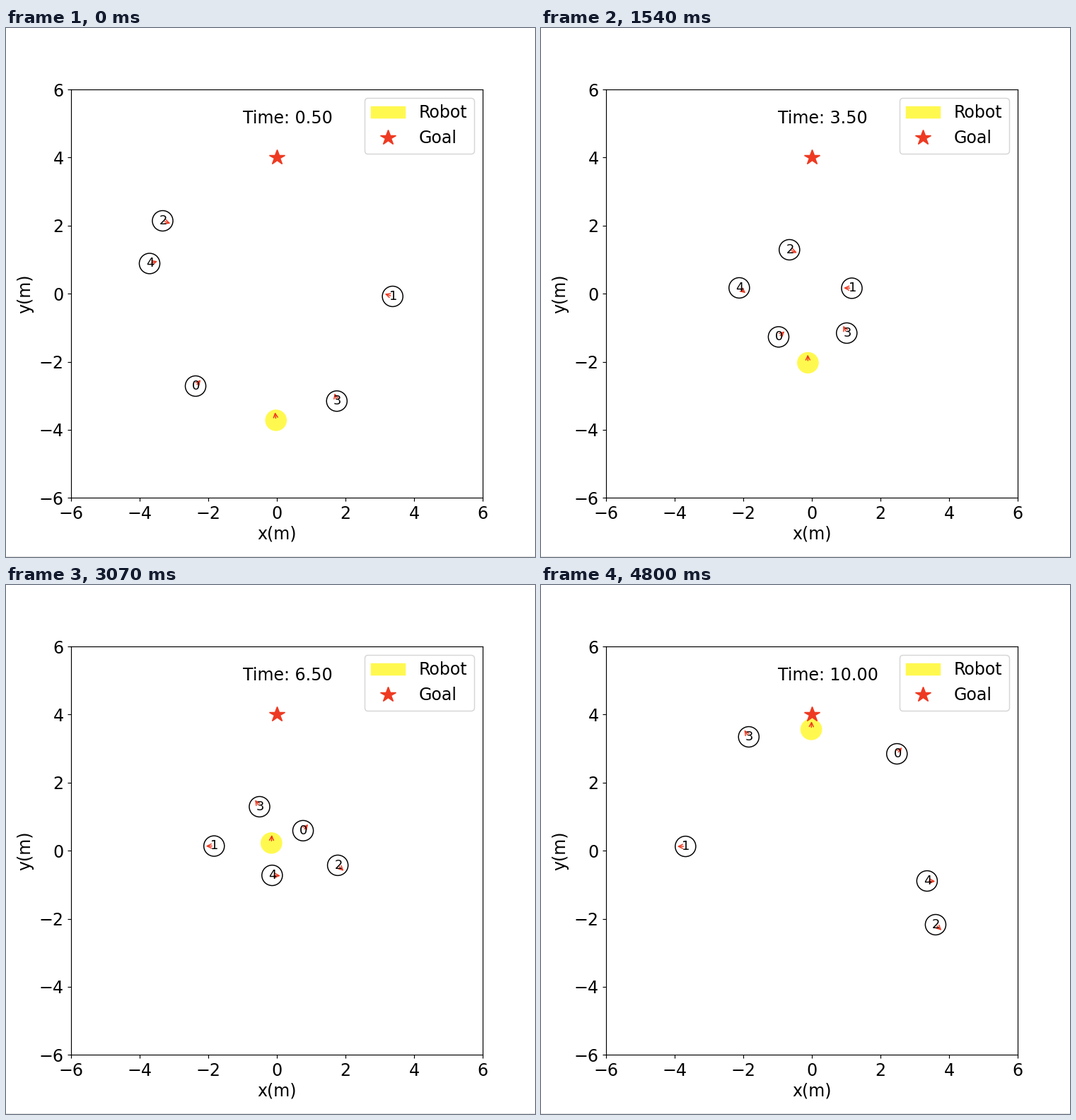
Write a matplotlib script that moves like this. It is 748 by 749 pixels and loops after 4870 ms.

```python
import numpy as np
import matplotlib.pyplot as plt
from matplotlib.animation import FuncAnimation
from matplotlib.lines import Line2D
from matplotlib.patches import ArrowStyle, Circle, FancyArrowPatch

W, H, DPI = 748, 749, 107.2
LOOP_MS, FRAMES = 4870, 146
DT = 0.25                  # simulated seconds per step
LAST = 38                  # number of steps in the run
KEY_STEPS = [0, 7, 12, 21]  # after the last one all agents head for their goals
RADIUS = 0.3
RED, YELLOW = "#ee3a22", "#fff94f"

# Four key points in metres, then the goal; the robot comes first.
AGENTS = [
    [(-0.025, -3.72), (-0.1, -2.72), (-0.115, -2.03), (-0.19, -0.525), (0, 4)],
    [(-2.37, -2.715), (-1.59, -1.865), (-0.97, -1.27), (0.31, -0.01), (2.59, 2.99)],
    [(3.375, -0.08), (2.305, 0.09), (1.165, 0.16), (-1.08, 0.14), (-3.735, 0.125)],
    [(-3.33, 2.14), (-1.757, 1.664), (-0.654, 1.29), (1.233, 0.087), (3.694, -2.258)],
    [(1.748, -3.156), (1.392, -2.05), (1.016, -1.158), (-0.097, 0.662), (-1.898, 3.434)],
    [(-3.711, 0.886), (-2.79, 0.678), (-2.117, 0.17), (-0.887, -0.69), (4.2, -0.93)],
]


def unit(v):
    return v / np.linalg.norm(v)


def make_track(points):
    """List of (position, unit heading) for every step of the run."""
    *keys, goal = np.array(points, float)
    curves = [np.poly1d(np.polyfit(KEY_STEPS, axis, 3)) for axis in np.transpose(keys)]
    track = []
    for step in range(KEY_STEPS[-1] + 1):
        pos = np.array([c(step) for c in curves])
        track.append((pos, unit(np.array([c.deriv()(step) for c in curves]))))

    # 1 m/s, slowing in proportion to the distance inside the last metre.
    while len(track) <= LAST:
        to_goal = goal - pos
        pos = pos + DT * to_goal / max(1, np.linalg.norm(to_goal))
        track.append((pos, unit(to_goal)))
    return track


fig = plt.figure(figsize=((W + 0.01) / DPI, (H + 0.01) / DPI), dpi=DPI, facecolor="white")
ax = fig.add_axes([92 / W, 83.7 / H, 582 / W, 578.3 / H])
ax.set_xlim(-6, 6)
ax.set_ylim(-6, 6)
ax.set_xticks(range(-6, 7, 2))
ax.set_yticks(range(-6, 7, 2))
ax.tick_params(labelsize=16)
ax.set_xlabel("x(m)", fontsize=16, labelpad=3.3)
ax.set_ylabel("y(m)", fontsize=16, labelpad=5)
fig.add_artist(Line2D([0, 1], [0.5 / H] * 2, color="#e2e2e2", linewidth=72 / DPI))

robot = ax.add_patch(Circle((0, 0), RADIUS, color=YELLOW))
goal_star = Line2D([0], [4], color=RED, marker="*", linestyle="None", markersize=15)
ax.add_artist(goal_star)
ax.legend([robot, goal_star], ["Robot", "Goal"], fontsize=16, loc="upper right",
          handletextpad=0.85)
clock = ax.text(-1, 5, "", fontsize=16)

tracks = [make_track(points) for points in AGENTS]
circles, labels, arrows = [robot], [clock], []
for i in range(len(AGENTS) - 1):
    circles.append(ax.add_patch(Circle((0, 0), RADIUS, fill=False, color="black")))
    labels.append(ax.text(0, 0, str(i), color="black", fontsize=12))
for _ in AGENTS:
    arrows.append(ax.add_patch(FancyArrowPatch(
        (0, 0), (1, 1), color=RED,
        arrowstyle=ArrowStyle("->", head_length=4, head_width=2))))


def update(frame):
    # The run is seen at 15 pictures a second (two frames each), 8 steps a second.
    step = min((frame + 1) // 2 * 8 // 15, LAST)
    clock.set_text(f"Time: {0.5 + step * DT:.2f}")
    for track, circle, arrow in zip(tracks, circles, arrows):
        pos, heading = track[step]
        circle.center = tuple(pos)
        arrow.set_positions(tuple(pos), tuple(pos + RADIUS * heading))
    for circle, label in zip(circles[1:], labels[1:]):
        x, y = circle.center
        label.set_position((x - 0.1, y - 0.1))
    return [*labels, *circles, *arrows]


anim = FuncAnimation(fig, update, frames=FRAMES, interval=LOOP_MS / FRAMES,
                     repeat=True, blit=False)
plt.show()
```
